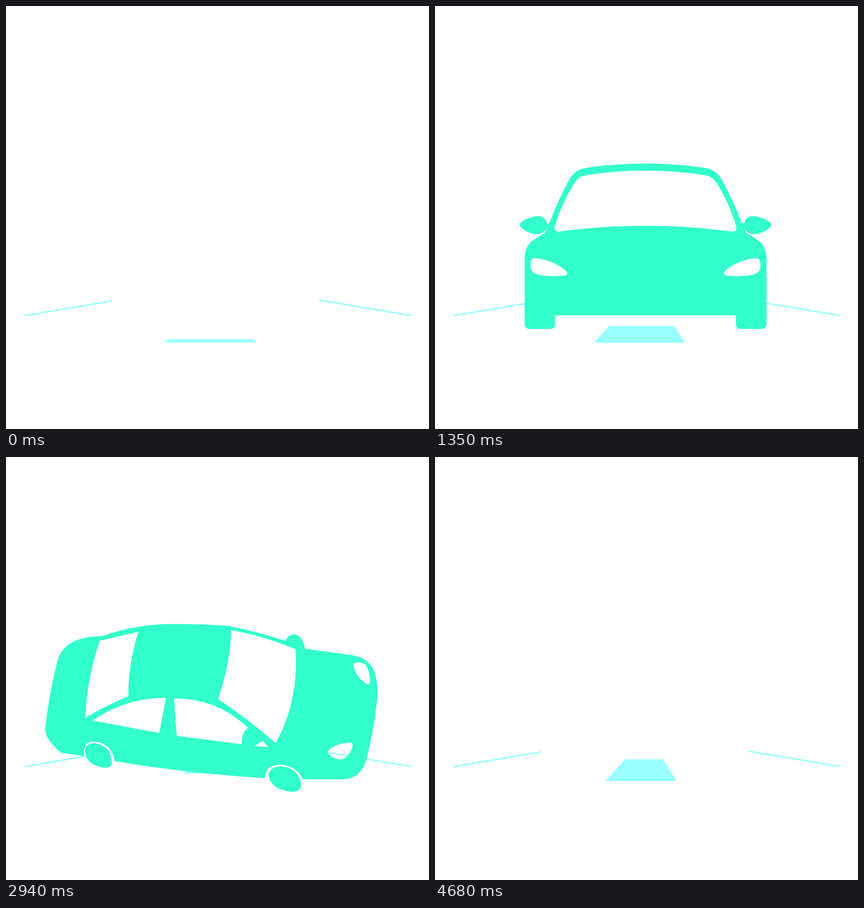
Animation of 748x748 px, one loop 5250 ms. Source, as an HTML page:

```html
<!DOCTYPE html>
<html lang="en">
<head>
<meta charset="utf-8">
<title>Car</title>
<style>
html, body { margin: 0; width: 100%; height: 100%; overflow: hidden; background: #fff; }
svg { display: block; width: 100vw; height: 100vh; }
</style>
</head>
<body>
<svg viewBox="0 0 748 748">
  <defs>
    <!-- left half of the front view: body, windscreen, lamp -->
    <path id="half" fill-rule="evenodd" d="M372.8 278.5Q310 279 263 287Q249 290 239 304Q220 338 202 384L198 385Q195 372 183 371.5C170 372 150 380 150 387S168 403 180 403.5Q191 404 197 393.5L194 402Q183 407 171 416Q158.5 427 158.5 447V563a8 8 0 0 0 8 8h38a8 8 0 0 0 8-8V547H372.8Z
      M372.8 291Q316 291 266 299.5Q254 301 246 314Q224 349 212 389Q210 400 219 399Q295 388.5 372.8 388.5Z
      M175 446C195 446 222 458 232 469Q238 476 226 477Q202 479 184 475.5Q169 472 169 460Q169 446 175 446Z"/>
    <g id="front"><use href="#half"/><use href="#half" transform="translate(744.6) scale(-1 1)"/></g>

    <g id="turned">
      <path fill-rule="evenodd" d="M97 523Q70 500 69 481Q77 413 92 357Q106 317 169 317Q223 298 280 295.5Q336 294.5 392 298.5Q446 309 494 325Q499 314 509 313.5Q525 315 528.5 339L609 350Q637 354 647 371Q658 390 657 420Q653 470 638 533Q628 570 594 570H525Q514 546 485 544Q457 545 458 568Q320 559 192 538Q188 506 155 503Q136 503 138 529Z
        M166 325L234 309Q215 372 216.5 423Q180 438 140 461Q144 386 166 325Z
        M398 306Q458 317 512 340Q518 431 477 506Q428 463 375 428Q397 364 398 306Z
        M153 466Q214 425 283 426L271 488Z
        M297 427Q373 426 428 479Q417 486 417 508L302 493Z
        M439 511L454 502L464 513Z
        M614 366Q622 360 634 366Q645 376 643 401Q639 404 628 394Q614 378 614 366Z
        M569 521Q578 507 610 505Q617 507 608 523Q601 535 589 535Q570 530 569 521Z"/>
      <path d="M487 547Q520 551 522 582Q521 592 505 592Q468 588 464 562Q467 547 487 547Z
        M155 506Q186 509 187 541Q187 550 174 549.5Q141 545 140 520Q140 507 155 506Z"/>
    </g>

    <g id="flipped">
      <path fill-rule="evenodd" d="M110 356H187.5a50 55 0 0 0 100 0H526.5a50 55 0 0 0 100 0H709Q718 356 717 364L711 376Q714 379 714.5 384Q711 440 672 449Q622 460 567 468Q482 540 370 541.5Q253 541.5 149 467Q138 463 114 467Q107 466 104 442Q98 434 91.5 422Q91 364 110 356Z
        M162 464Q245 459 329 459L328 531Q233 517 162 464Z
        M354 459Q460 459 548 467Q467 533 372 533L342 532Z
        M94 425Q116 427 116 450Q116 454 108 454Q108 440 94 425Z
        M650 437Q652 415 675 410Q701 407 698 417Q692 436 655 444Q649 444 650 437Z"/>
      <circle cx="237" cy="364" r="43"/><circle cx="576" cy="364" r="43"/>
    </g>
  </defs>
  <path d="M33 547.5L187.5 521.5M553.5 520L717 547.5" fill="none" stroke="#9ff" stroke-width="2.6"/>
  <path id="dash" fill="#9ff"/>
  <g id="car" fill="#3fc"></g>
</svg>
<script>
const LOOP = 5250, BEAT = 90;
const LAND = 540, TURN = 2520, FLIPPED = 3330, BREAK = 4410, GONE = 4680;
const HORIZON = 492, NEAR = 595.5;
const dash = document.getElementById('dash');
const car = document.getElementById('car');

const lerp = (a, b, u) => a + (b - a) * u;
const span = (t, a, b) => Math.max(0, Math.min(1, (t - a) / (b - a)));
const use = (id, transform = '') => `<use href="#${id}" transform="${transform}"/>`;

// strips of the broken car: left, width, lift, lower edge
const strips = [[115, 29, 67], [237, 58, 51], [365, 25, 49], [432, 24, 116],
  [492, 34, 61], [571, 31, 42, 442], [655, 15, 35, 451]]
  .map(([x, w, lift, end = 470]) => ({ x, w, lift, end }));

// the same strips squeezed to the width of the front view
const frontStrips = strips.map(({ x, w, lift }) =>
  ({ x: 372 + (x - 404) * 0.7, w, lift: lift * 1.2, end: 575 }));

function pose(id, rot, sx, sy, cx = 363, cy = 440) {
  return use(id, `translate(${cx} ${cy}) rotate(${rot}) scale(${sx} ${sy}) translate(${-cx} ${-cy})`);
}

// lifts the strips out of the body
function sliced(id, list, amount, body) {
  let hole = 'M0 0H748V748H0Z', clips = '', parts = '';
  list.forEach(({ x, w, lift, end }, i) => {
    const box = `M${x} 0h${w}V${end}h${-w}Z`;
    hole += box;
    clips += `<clipPath id="c${i}"><path d="${box}"/></clipPath>`;
    parts += `<g transform="translate(0 ${-lift * amount})"><g clip-path="url(#c${i})">${use(id)}</g></g>`;
  });
  clips += `<clipPath id="rest"><path clip-rule="evenodd" d="${hole}"/></clipPath>`;
  return clips + (body ? `<g clip-path="url(#rest)">${use(id)}</g>` : '') + parts;
}

// the picture changes every 60 ms while the car lands or rolls, else every 90 ms
function hold(t) {
  const step = t < LAND || (t >= TURN && t < FLIPPED) ? 60 : BEAT;
  return Math.floor(t / step) * step;
}

// one road mark recedes towards the horizon in seven beats, then the road stops
function drawDash(t) {
  const n = Math.min(38, Math.floor(t / BEAT)) % 7;
  const top = HORIZON + 97 * 0.76 ** n;
  const end = Math.min(NEAR, HORIZON + 97 * 0.835 ** (n - 2));
  const left = y => 281 + (NEAR - y) * 0.908;
  const right = y => 442 - (NEAR - y) * 0.645;
  dash.setAttribute('d', `M${left(end)} ${end}L${left(top)} ${top}H${right(top)}L${right(end)} ${end}Z`);
}

function carAt(t) {
  if (t < 60 || t >= GONE) return '';
  if (t < LAND) return sliced('front', frontStrips, 1 - (t / LAND) ** 2, t >= 180);
  if (t < 2700) {
    const u = span(t, TURN, 2700);
    return pose('front', 4 * u, 1 + 0.06 * u, 1 - 0.06 * u);
  }
  if (t < 2940) {
    const u = span(t, 2700, 2940);
    return pose('turned', lerp(-5, 0, u), lerp(0.77, 1, u), 1);
  }
  if (t < 3120) {
    const u = span(t, 2940, 3120);
    return pose('turned', -6 * u, 1 + 0.05 * u, 1 - 0.15 * u);
  }
  if (t < BREAK) {
    const u = span(t, 3120, FLIPPED);
    return pose('flipped', 5 * (1 - u), lerp(0.92, 1, u), lerp(0.8, 1, u), 404);
  }
  const beat = (t - BREAK) / BEAT;
  return sliced('flipped', strips, 1 + beat * 0.353, beat < 2);
}

let shown = -1;
function draw(now) {
  const t = hold(now % LOOP);
  if (t === shown) return;
  shown = t;
  drawDash(t);
  car.innerHTML = carAt(t);
}

const begin = performance.now();
function tick() {
  draw(performance.now() - begin);
  requestAnimationFrame(tick);
}
tick();
</script>
</body>
</html>
```
